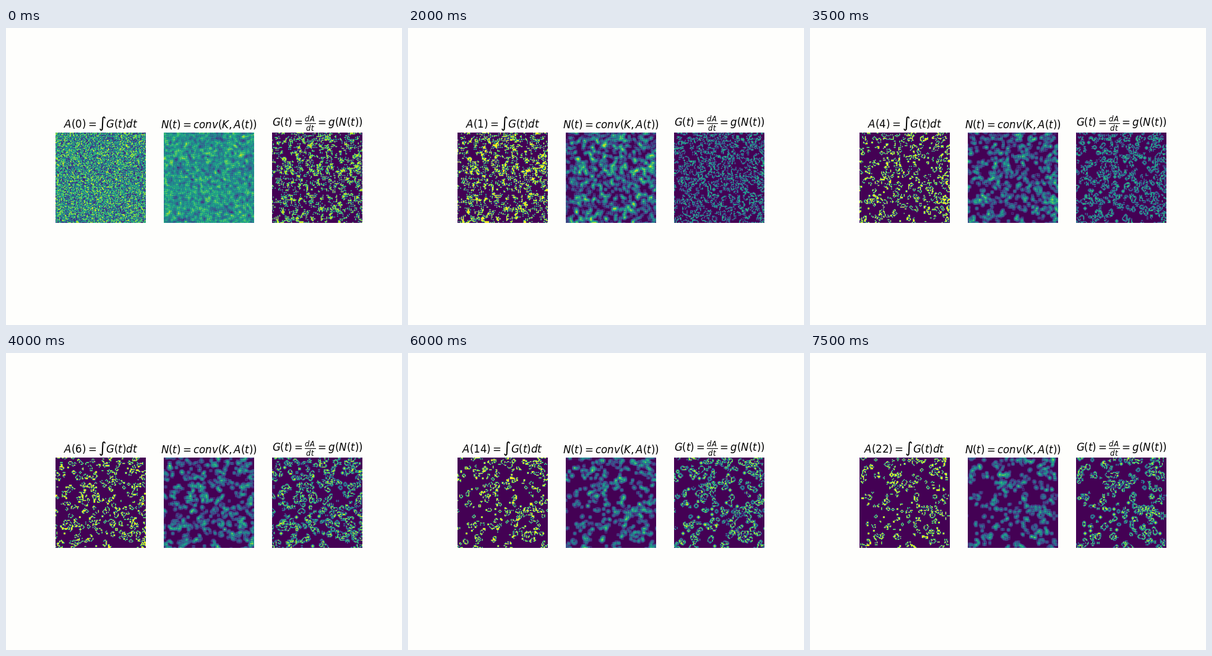
A matplotlib script that plays this animation: 640 by 480 pixels, repeating every 8000 ms.

```python
import numpy as np
import matplotlib.pyplot as plt
from matplotlib.animation import FuncAnimation

SIZE = 100
STEPS = [0, 0, 0, 0, 1, 2, 3, 4, 6, 8, 10, 12, 14, 16, 19, 22]
SHIFTS = [(dy, dx) for dy in (-1, 0, 1) for dx in (-1, 0, 1) if dy or dx]


def conv(cells):
    """Sum of the eight neighbours on a torus."""
    return sum(np.roll(cells, s, axis=(0, 1)) for s in SHIFTS)


def growth(n):
    """Birth near 3 neighbours, survival near 2, decay elsewhere."""
    return np.where((n > 2.5) & (n < 3.5), 1.0,
                    np.where((n > 1.5) & (n <= 2.5), 0.0, -1.0))


def simulate(last):
    cells = np.random.default_rng(7).random((SIZE, SIZE))
    states = []
    for _ in range(last + 1):
        n = conv(cells)
        g = growth(n)
        states.append((cells, n, g))
        cells = np.clip(cells + g, 0, 1)
    return states


states = simulate(STEPS[-1])

fig, axes = plt.subplots(1, 3, figsize=(6.4, 4.8), dpi=100, facecolor="#fefefc")
images = []
for ax, field in zip(axes, states[0]):
    images.append(ax.imshow(field, cmap="viridis"))
    ax.axis("off")

title = axes[0].set_title("")
axes[1].set_title(r"$N(t)=conv(K,A(t))$", pad=5.28)
axes[2].set_title(r"$G(t)=\frac{dA}{dt}=g(N(t))$")


def update(i):
    t = STEPS[i]
    for image, field in zip(images, states[t]):
        image.set_data(field)
        image.autoscale()
    # growth is shown dimmer while the noise settles
    images[2].set_clim(-1, 2 if 0 < t <= 4 else 1.2)
    title.set_text(rf"$A({t})=\int G(t)dt$")
    return images + [title]


anim = FuncAnimation(fig, update, frames=len(STEPS), interval=500,
                     repeat=True, repeat_delay=0, blit=False)
plt.show()
```
